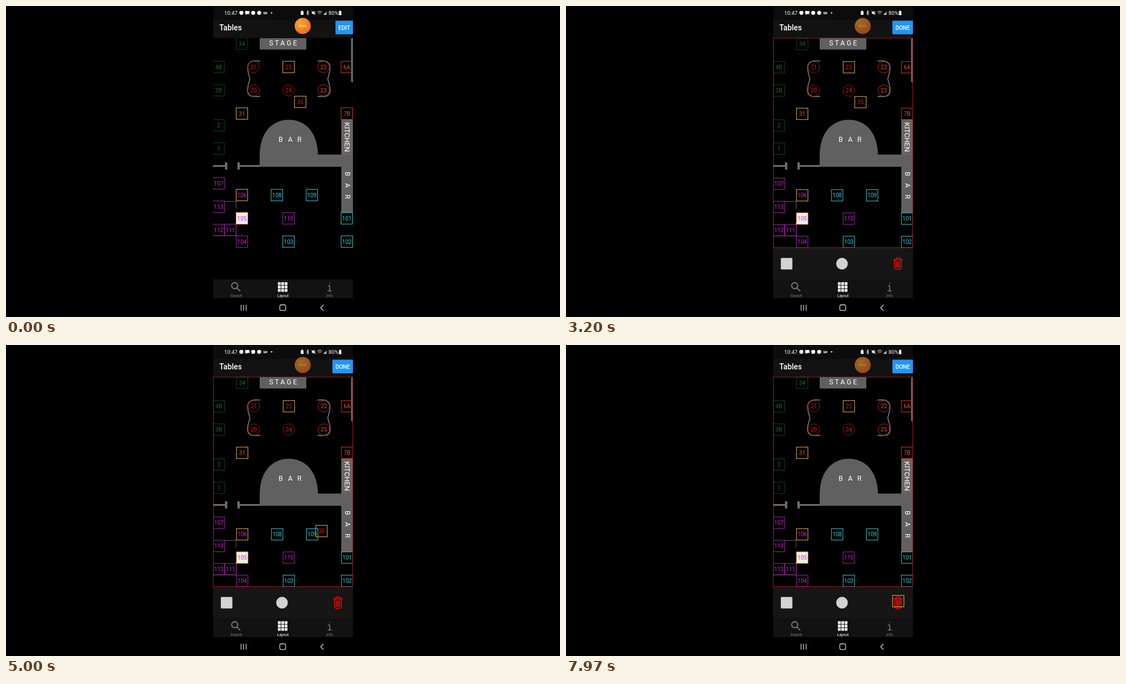
An HTML page that plays this animation: 998 by 561 pixels, repeating every 8 s.

```html
<!DOCTYPE html>
<html lang="en">
<head>
<meta charset="utf-8">
<title>Table layout editor</title>
<style>
html, body { margin: 0; width: 100%; height: 100%; overflow: hidden; background: #000; }
svg { display: block; width: 100vw; height: 100vh; }
text { font-family: Roboto, "Open Sans", sans-serif; text-anchor: middle; fill: #fff; }
.line { fill: none; stroke-linecap: round; stroke-linejoin: round; }
</style>
</head>
<body>
<svg viewBox="0 0 998 561">
  <defs>
    <clipPath id="clip"><rect id="clipBox" x="373" y="57.5" width="252" height="435"/></clipPath>
    <radialGradient id="orbFill" cx=".35" cy=".3" r=".8">
      <stop offset="0" stop-color="#ffa52c"/><stop offset="1" stop-color="#f0681c"/>
    </radialGradient>
  </defs>

  <!-- floor plan -->
  <g clip-path="url(#clip)">
    <g fill="#606060">
      <path d="M457 58h84v20.5h-84z"/>
      <path d="M457 290V268C458 226 481 205.300 509.500 205.300S561 226 562 268H604V205H625V373H604V290z"/>
      <path fill="#6a6462" d="M604 205h20.500v63H604z"/>
      <path fill="#707070" d="M373 287h21.500v-5h4v13h-4v-5H373zM457 287h-36v-5h-4v13h4v-5h36z"/>
    </g>
    <g class="line" stroke="#707070" stroke-width="1.800">
      <path id="sofa" d="M457 99.500C441 97 434 103 435.500 114C436 122 438 125 439.300 131.500C438 138 436 141 435.200 149C434 161 440 165 457 163"/>
      <use href="#sofa" transform="matrix(-1 0 0 1 1019 0)"/>
    </g>
    <path class="line" stroke="#5d5d5d" d="M394 352.500h20.500v13M414.500 390v24.500H373"/>
    <text x="500.500" y="71.300" font-size="12.500" letter-spacing="3">STAGE</text>
    <g id="barText" font-size="12.500"><text x="495" y="245">B</text><text x="512" y="245">A</text><text x="528.500" y="245">R</text></g>
    <g font-size="12.500"><text transform="translate(611 303) rotate(90)">B</text><text transform="translate(611 323.500) rotate(90)">A</text><text transform="translate(611 344) rotate(90)">R</text></g>
    <text transform="translate(609.500 236.500) rotate(90)" font-size="13">KITCHEN</text>
    <g id="tables"></g>
    <rect x="621.500" y="58" width="5" height="79.500" rx="1.800" fill="#686868"/>
  </g>

  <!-- header -->
  <path fill="#0c0c0c" d="M373 0h252v25H373z"/>
  <path fill="#121212" d="M373 25h252v32.500H373z"/>
  <text x="404.500" y="44" font-size="13.800" font-weight="500">Tables</text>
  <g id="button">
    <rect id="buttonBox" y="26.500" height="24.500" rx="1" fill="#2196f3"/>
    <text id="buttonText" y="42.600" font-size="10" font-weight="500"></text>
  </g>

  <!-- status bar -->
  <text x="405" y="16.300" font-size="9.700">10:47</text>
  <text x="590" y="16.300" font-size="9.700">80%</text>
  <g fill="#fff">
    <circle cx="424" cy="12.300" r="3.600"/>
    <path d="M431 9h7.500v5.500h-4l-2 2v-2H431z"/>
    <circle cx="445.300" cy="12.300" r="3.600"/><circle cx="456" cy="12.300" r="3.600"/>
    <circle cx="478.500" cy="12.300" r="1.200"/>
    <path d="M531 10h1v-1.500h3V10h1v6h-5zM551 10.500h2l2-2v7.500l-2-2h-2z"/>
    <path d="M599.800 9.500h1v-1h2.400v1h1v7h-4.400z"/>
    <path fill="#777" d="M572 16h6V9z"/><path d="M572 16h3.500v-4z"/>
  </g>
  <g class="line" stroke="#fff" stroke-width=".9">
    <circle cx="465.200" cy="12.500" r="1.500"/><circle cx="468.800" cy="12.500" r="1.500"/><path d="M465 14h4"/>
    <path d="M541.500 10.300l4 4-2 2v-8l2 2-4 4M550.500 9l7 7M556.500 10v4M561 11q4-4 8 0M562.500 13q2.500-2.500 5 0M565 15v.2"/>
  </g>

  <!-- recorder bubble -->
  <g id="orb">
    <circle cx="534.500" cy="36" r="14.500" fill="url(#orbFill)"/>
    <text id="clock" x="534.500" y="38" font-size="5.800"></text>
  </g>

  <!-- editing tools -->
  <g id="tools">
    <path fill="#161616" d="M373 436h252v57H373z"/>
    <rect x="373.400" y="57.900" width="251.200" height="378" fill="none" stroke="#b3202c" stroke-width=".9"/>
    <rect x="387" y="454.500" width="20.800" height="20.800" rx="1.500" fill="#d2d2d2"/>
    <circle cx="497.200" cy="464.800" r="10.500" fill="#d2d2d2"/>
    <path class="line" stroke="#f00a0a" stroke-width="1.600" d="M590 457.800h16M594 457.500l.8-3h6.400l.8 3M591.700 458l.8 15q.1 1.800 1.800 1.800h7.400q1.700 0 1.800-1.800l.8-15M595.300 461l.3 10.500M598 461v10.500M600.700 461l-.3 10.500"/>
  </g>

  <!-- tab bar and system keys -->
  <path fill="#121212" d="M373 493h252v34H373z"/>
  <g class="line" stroke="#7d7d7d" stroke-width="1.900">
    <circle cx="412" cy="504.500" r="5.500"/><path d="M416.200 508.800l5.300 5.300"/>
    <path stroke-width="1.500" d="M580.500 505h2.700v9M580 514h6M583 500.500v.5"/>
  </g>
  <g id="grid" fill="#fff"></g>
  <g font-size="6.900">
    <text x="415" y="525" style="fill:#7d7d7d">Search</text>
    <text x="499" y="525">Layout</text>
    <text x="583" y="525" style="fill:#7d7d7d">Info</text>
  </g>
  <path fill="#000" d="M373 527h252v34H373z"/>
  <g class="line" stroke="#cfcfcf" stroke-width="1.300">
    <path d="M423.500 539.500v9.500M428 539.500v9.500M432.500 539.500v9.500M571.800 539.200l-5 5 5 5"/>
    <rect x="493.200" y="539" width="10.600" height="10.400" rx="3"/>
  </g>
  <g id="drag"></g>
</svg>
<script>
const $ = id => document.getElementById(id);
const GREEN = '#17722a', DIM = '#0c4a15', RED = '#e01818', ORANGE = '#f2511f',
  YELLOW = '#e9c03c', PINK = '#d824dc', PURPLE = '#a32ab0', CYAN = '#2fd3da';
const CELL = 21;

// Each group: text colour, border colour, then label:column:row
const groups = [
  [GREEN, DIM, '34:2:0 4B:0:2 3B:0:4 2:0:7 1:0:9'],
  [ORANGE, '#d4421c', '6A:11:2 7B:11:6'],
  [RED, YELLOW, '25:6:2 35:7:5'],
  [ORANGE, YELLOW, '31:2:6'],
  [RED, '#a01515', '21:3:2:o 20:3:4:o 24:6:4:o'],
  [ORANGE, '#a83214', '22:9:2:o 23:9:4:o'],
  [PINK, PURPLE, '107:0:12 113:0:14 112:0:16 111:1:16 104:2:17 110:6:15'],
  [PINK, YELLOW, '106:2:13 105:2:15'],
  [CYAN, CYAN, '108:5:13 109:8:13 101:11:15 103:6:17 102:11:17'],
];

function table(label, ink, edge, round) {
  const fill = label === '105' ? '#f0eeee' : 'none';
  const shape = round ? '<circle r="10.300"' : '<rect x="-10.300" y="-10.300" width="20.600" height="20.600"';
  return `${shape} fill="${fill}" stroke="${edge}"/><text y="3.700" font-size="10.200" style="fill:${ink}">${label}</text>`;
}

$('tables').innerHTML = groups.map(([ink, edge, list]) => list.split(' ').map(item => {
  const [label, col, row, round] = item.split(':');
  const x = 373 + (+col + .5) * CELL, y = 58 + (+row + .5) * CELL;
  return `<g id="t${label}" transform="translate(${x} ${y})">${table(label, ink, edge, round)}</g>`;
}).join('')).join('');

for (let i = 0; i < 9; i++)
  $('grid').innerHTML += `<rect x="${489.8 + i % 3 * 6.1}" y="${498.3 + (i / 3 | 0) * 6.1}" width="5" height="5"/>`;

const clamp = v => Math.max(0, Math.min(1, v));
const ramp = (t, a, b) => clamp((t - a) / (b - a));

// Position along [time, x, y] points
function along(points, t) {
  let i = 1;
  while (i < points.length - 1 && t > points[i][0]) i++;
  const [a, b] = [points[i - 1], points[i]], k = ramp(t, a[0], b[0]);
  return [a[1] + (b[1] - a[1]) * k, a[2] + (b[2] - a[2]) * k];
}

function spring(ms) {
  const s = Math.max(0, ms) / 1000;
  return 1 - Math.exp(-11 * s) * (Math.cos(10.45 * s) + 1.053 * Math.sin(10.45 * s));
}

const EDIT = 830, DROP = 4915, GONE = 5600;
const ticks = [2000, 3230, 4060, 4900, 5600, 6300, 7250];
const path35 = [[3250, 530.5, 173.5], [3600, 537, 188], [3900, 556, 232], [4250, 576, 325], [4600, 593, 430], [4800, 598, 462]];
const path25 = [[5950, 509.5, 110.5], [6200, 512, 117], [6430, 523.5, 140.5], [6700, 541, 198], [7000, 565, 290],
  [7300, 590, 395], [7530, 603, 452], [7700, 603, 463], [7970, 598.5, 462]];

function dragged(t) {
  if (t >= path35[0][0] && t < GONE) {
    const [x, y] = along(path35, t), k = spring(t - DROP);
    return ['35', x + (530.5 - x) * k, y + (173.5 - y) * k];
  }
  if (t >= path25[0][0]) return ['25', ...along(path25, t)];
}

function draw(t) {
  const editing = t >= EDIT, left = editing ? 588 : 593.5;
  $('tools').style.display = editing ? '' : 'none';
  $('clipBox').setAttribute('height', editing ? 378.5 : 435);
  $('tables').setAttribute('transform', editing ? '' : 'translate(-.5 -.5)');
  $('buttonBox').setAttribute('x', left);
  $('buttonBox').setAttribute('width', 625 - left);
  $('buttonText').setAttribute('x', (625 + left) / 2);
  $('buttonText').textContent = editing ? 'DONE' : 'EDIT';
  $('button').setAttribute('opacity', 1 - .8 * ramp(t, 580, 730) * (1 - ramp(t, EDIT, EDIT + 210)));
  $('orb').setAttribute('opacity', 1 - .4 * ramp(t, 1600, 1770));
  $('clock').textContent = '00:0' + ticks.filter(at => t >= at).length;
  $('t35').style.display = t >= DROP - 15 ? 'none' : '';

  const item = dragged(t);
  $('drag').innerHTML = item ? table(item[0], RED, YELLOW) : '';
  if (item) $('drag').setAttribute('transform', `translate(${item[1]} ${item[2]})`);
}

function frame() {
  draw(performance.now() % 8000);
  requestAnimationFrame(frame);
}
frame();
</script>
</body>
</html>
```
